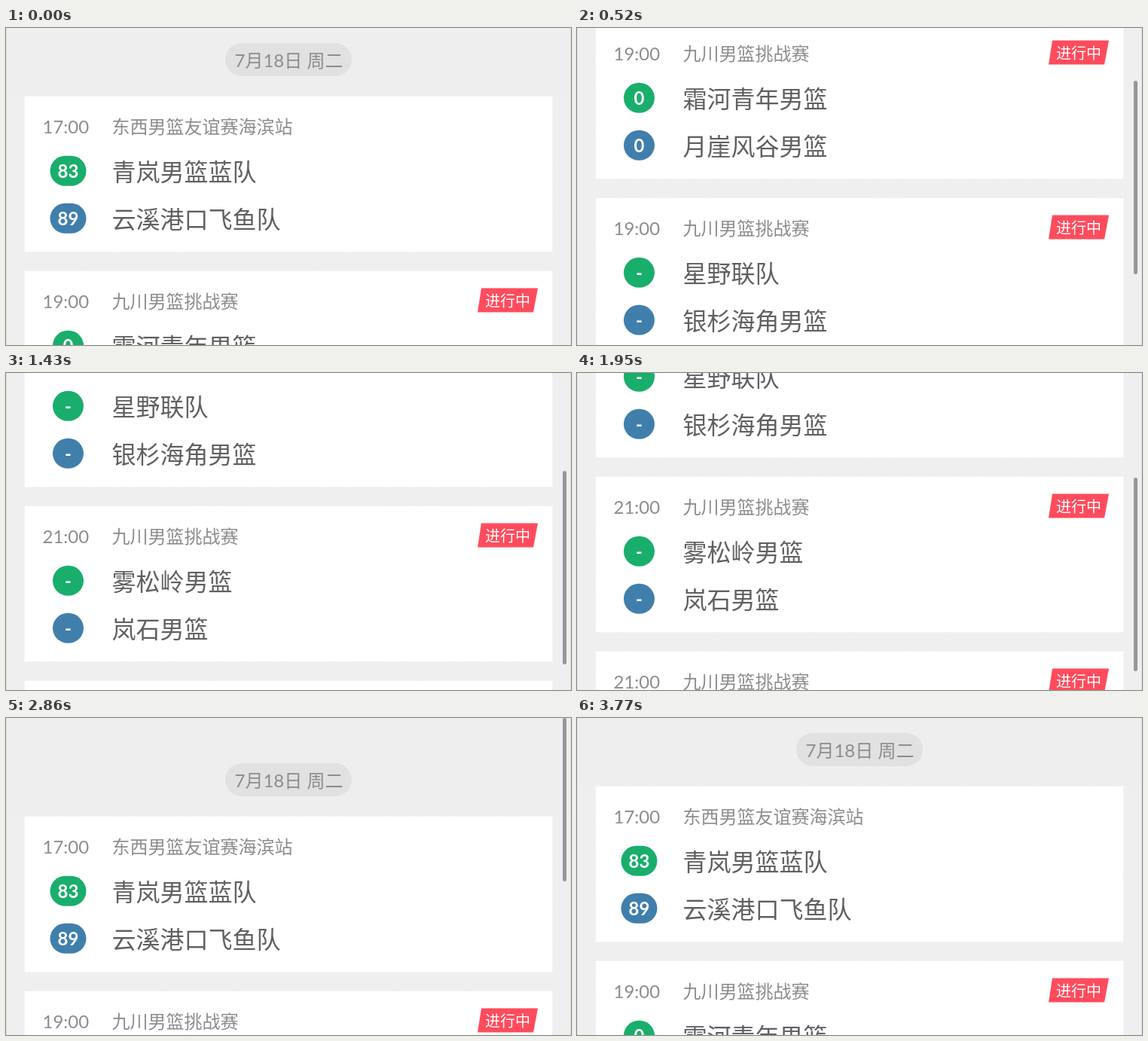
Recreate the animation shown at these times as an HTML page. Size 750x421 px, loop 3900 ms.

```html
<!DOCTYPE html>
<html lang="zh-CN">
<head>
<meta charset="utf-8">
<title>赛程</title>
<style>
  html, body { margin: 0; width: 100%; height: 100%; overflow: hidden; background: #efefef; }
  svg { display: block; width: 750px; height: 421px; }
  text { font: 400 24px Lato, "Noto Sans CJK SC", "Noto Sans CJK", sans-serif; fill: #8c8c8c; }
  .event { font-weight: 350; }
  .team { font-size: 32px; font-weight: 350; fill: #606060; }
  .score { font-weight: 700; fill: #fff; text-anchor: middle; }
  .live { font-size: 20px; fill: #fff; }
  .card { fill: #fff; stroke: #efefef; stroke-dasharray: 2 2; }
</style>
</head>
<body>
<svg viewBox="0 0 750 421">
  <rect width="750" height="421" fill="#efefef"/>
  <g id="list"></g>
  <rect id="bar" x="739" width="5" rx="2.5" fill="#979797"/>
  <path d="M.5 0V421M749.5 0V421" stroke="#e2e2e2"/>
</svg>
<script>
const STEP = 130, COUNT = 30;
const CARD_TOP = 90, CARD_PITCH = 232;
const NAME_X = 140.4, BADGE_X = 82.5, BADGE_H = 40;
const GREEN = '#19ae6c', BLUE = '#407fac';
const CUP = '九川男篮挑战赛';

// time, event, live, then [score, team] pairs
const games = [
  ['17:00', '东西男篮友谊赛海滨站', false, ['83', '青岚男篮蓝队'], ['89', '云溪港口飞鱼队']],
  ['19:00', CUP, true, ['0', '霜河青年男篮'], ['0', '月崖风谷男篮']],
  ['19:00', CUP, true, ['-', '星野联队'], ['-', '银杉海角男篮']],
  ['21:00', CUP, true, ['-', '雾松岭男篮'], ['-', '岚石男篮']],
  ['21:00', CUP, true]
];

const text = (x, y, str, cls = '') => `<text x="${x}" y="${y}" class="${cls}">${str}</text>`;

function teamRow([score, name], i) {
  const y = 99.8 + i * 63;
  const w = score.length > 1 ? 48 : 41;
  return `<rect x="${BADGE_X - w / 2}" y="${y - BADGE_H / 2}" width="${w}" height="${BADGE_H}" rx="20" fill="${i ? BLUE : GREEN}"/>`
    + text(BADGE_X, y + 9.2, score, 'score') + text(NAME_X, y + 13, name, 'team');
}

function card([time, event, live, ...teams], i) {
  const tag = '<path d="M631 23.6H706L700 55.6H626Z" fill="#ff4c5d"/>' + text(636, 48, '进行中', 'live');
  return `<g transform="translate(0 ${CARD_TOP + i * CARD_PITCH})">
    <rect class="card" x="24.5" y=".5" width="701" height="207"/>`
    + text(48.5, 50, time) + text(NAME_X, 50, event, 'event') + (live ? tag : '')
    + teams.map(teamRow).join('') + '</g>';
}

const list = document.getElementById('list');
const bar = document.getElementById('bar');
list.innerHTML = '<rect y="-90" width="750" height="180" fill="#eee"/>'
  + '<rect x="291" y="20" width="168" height="44" rx="22" fill="#e1e1e1"/>'
  + text(303.5, 52, '7月18日 周二') + games.map(card).join('');

// Drag and fling down with friction, then fling back up and bounce at the top.
const dragDown = [0, 25];
const flingUp = [620, 495, 322, 159, 30, -45, -40, -16, -5, -1];
const barFade = { 0: 0, 27: 0.75, 28: 0.3, 29: 0 };

function scrollAt(n) {
  if (n < 2) return dragDown[n];
  if (n < 16) return Math.round(673 - 344 * Math.exp((520 - n * STEP) / 536));
  return flingUp[n - 16] ?? 0;
}

function draw(now) {
  const n = Math.floor(now / STEP) % COUNT;
  const s = scrollAt(n);
  list.setAttribute('transform', `translate(0 ${-s})`);
  bar.setAttribute('y', Math.round(Math.max(0, s) * 0.2135));
  bar.setAttribute('height', 257 + Math.min(0, s));
  bar.setAttribute('opacity', barFade[n] ?? 1);
}

let start;
function tick(now) {
  start ??= now;
  draw(now - start);
  requestAnimationFrame(tick);
}
draw(0);
requestAnimationFrame(tick);
</script>
</body>
</html>
```
